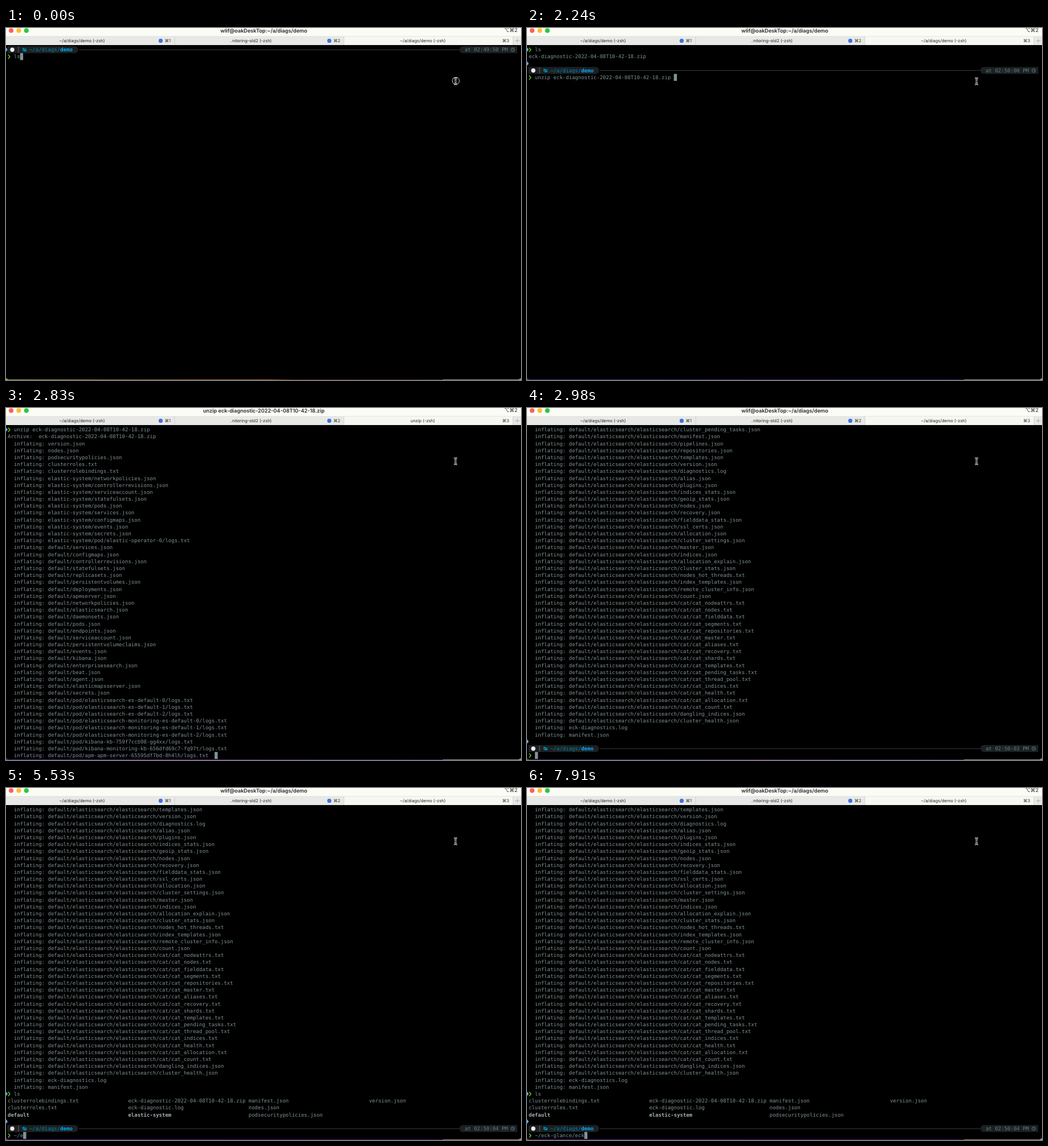
These frames come from a looping animation (904x619 px, 8000 ms). An HTML page with a canvas:

```html
<!DOCTYPE html>
<html lang="en">
<head>
<meta charset="utf-8">
<title>Terminal demo</title>
<style>
html, body { margin: 0; width: 100%; height: 100%; overflow: hidden; background: #000; }
canvas { display: block; }
</style>
</head>
<body>
<canvas id="stage" width="904" height="619"></canvas>
<script>
const ctx = document.getElementById('stage').getContext('2d');
const LOOP = 8000, CELL = 5.42, ROW = 12.19;
const MONO = '"DejaVu Sans Mono", monospace', SANS = 'Inter, sans-serif';
const GREY = '#7f9294', ZIP = 'eck-diagnostic-2022-04-08T10-42-18.zip';
const HOME = 'wlif@oakDeskTop:~/a/diags/demo', HOME_TAB = '~/a/diags/demo (-zsh)';
const colX = c => 3 + c * CELL;
const rowY = r => 32 + r * ROW;

// Terminal content
const inflate = (dir, names, ext = '') =>
  names.split(' ').map(n => '  inflating: ' + dir + n + ext);

const firstScreen = [
  '❯ unzip ' + ZIP,
  'Archive:  ' + ZIP,
  ...inflate('', 'version.json nodes.json podsecuritypolicies.json clusterroles.txt clusterrolebindings.txt'),
  ...inflate('elastic-system/', 'networkpolicies controllerrevisions serviceaccount statefulsets pods services configmaps events secrets', '.json'),
  ...inflate('elastic-system/pod/', 'elastic-operator-0', '/logs.txt'),
  ...inflate('default/', 'services configmaps controllerrevisions statefulsets replicasets persistentvolumes deployments apmserver networkpolicies elasticsearch daemonsets pods endpoints serviceaccount persistentvolumeclaims events kibana enterprisesearch beat agent elasticmapsserver secrets', '.json'),
  ...inflate('default/pod/', 'elasticsearch-es-default-0 elasticsearch-es-default-1 elasticsearch-es-default-2 elasticsearch-monitoring-es-default-0 elasticsearch-monitoring-es-default-1 elasticsearch-monitoring-es-default-2 kibana-kb-759f7ccb98-gg4xx kibana-monitoring-kb-656dfd69c7-fq97t apm-apm-server-65595df7bd-8h4lh', '/logs.txt')
];

const ES = 'default/elasticsearch/elasticsearch/';
const lastScreen = [
  ...inflate(ES, 'cluster_pending_tasks.json manifest.json pipelines.json repositories.json templates.json version.json diagnostics.log alias.json plugins.json indices_stats.json geoip_stats.json nodes.json recovery.json fielddata_stats.json ssl_certs.json allocation.json cluster_settings.json master.json indices.json allocation_explain.json cluster_stats.json nodes_hot_threads.txt index_templates.json remote_cluster_info.json count.json'),
  ...inflate(ES + 'cat/cat_', 'nodeattrs nodes fielddata segments repositories master aliases recovery shards templates pending_tasks thread_pool indices health allocation count', '.txt'),
  ...inflate(ES, 'dangling_indices cluster_health', '.json'),
  ...inflate('', 'eck-diagnostics.log manifest.json')
];

const listed = [
  ...lastScreen.slice(4), '❯ ls',
  ['clusterrolebindings.txt', ZIP, 'manifest.json', 'version.json'],
  ['clusterroles.txt', 'eck-diagnostic.log', 'nodes.json'],
  ['default', 'elastic-system', 'podsecuritypolicies.json']
];

// Timeline: each step holds until the next one
const steps = [];
const add = (at, scene) => steps.push({ at, glow: 1, title: HOME, tab: HOME_TAB, ...scene });
const lsDone = ['❯ ls', ZIP];
const busy = { title: 'unzip ' + ZIP, tab: 'unzip (-zsh)' };

add(0, { lines: [], prompt: 0, clock: '02:49:50', input: 'ls', glow: 0, click: true });
const typeZip = (at, input, glow) => add(at, { lines: lsDone, prompt: 3, clock: '02:50:00', input, glow });
typeZip(150, '', 0);
for (let i = 0; i < 7; i++) typeZip(1050 + i * 148.4, 'unzip e'.slice(0, i + 1), i / 7);
typeZip(2240, 'unzip ' + ZIP + ' ', 1);
add(2680, { lines: [...lsDone, firstScreen[0]], cursor: [0, 3], ...busy });
add(2830, { lines: firstScreen, cursor: [67, 47], ...busy });
add(2980, { lines: lastScreen, prompt: 46, clock: '02:50:03', input: '' });
add(3880, { lines: lastScreen, prompt: 46, clock: '02:50:03', input: 'ls' });
const typePath = (at, length, boldEnd) => add(at, {
  lines: listed, prompt: 46, clock: '02:50:04', input: '~/eck-glance/eck'.slice(0, length), boldEnd
});
[[4030, 0], [4780, 1], [5230, 2], [5530, 3], [5980, 4], [6130, 5], [6280, 6], [6420, 7],
 [6570, 8], [6720, 13, true], [7620, 14], [7770, 15], [7910, 16]].forEach(s => typePath(...s));

// Drawing helpers
function rect(x, y, w, h, color, radius = 0) {
  ctx.fillStyle = color;
  ctx.beginPath();
  ctx.roundRect(x, y, w, h, radius);
  ctx.fill();
}
function dot(x, y, r, color) {
  ctx.fillStyle = color;
  ctx.beginPath();
  ctx.arc(x, y, r, 0, 7);
  ctx.fill();
}
function stroke(path, color, width) {
  ctx.strokeStyle = color;
  ctx.lineWidth = width;
  ctx.stroke(new Path2D(path));
}
function label(str, x, y, size, weight = 400, align = 'left') {
  ctx.font = `${weight} ${size}px ${SANS}`;
  ctx.textAlign = align;
  ctx.fillStyle = '#262626';
  ctx.fillText(str, x, y);
}
function cells(str, col, row, color = GREY, bold = false) {
  ctx.font = `${bold ? 'bold ' : ''}9px ${MONO}`;
  ctx.textAlign = 'left';
  ctx.fillStyle = color;
  [...str].forEach((ch, i) => ch !== ' ' && ctx.fillText(ch, colX(col + i), rowY(row) + 9.2));
}
function chevron(row) {
  const y = rowY(row) + 6.3;
  stroke(`M3.8 ${y - 3.6}L6.8 ${y}L3.8 ${y + 3.6}`, '#63cf12', 1.5);
}
function mark(row) {
  const y = rowY(row) + 6;
  ctx.fillStyle = '#68b2f4';
  ctx.fill(new Path2D(`M0 ${y - 4}L3 ${y}L0 ${y + 4}Z`));
}
function cursor(col, row) {
  rect(colX(col), rowY(row), CELL, ROW, '#819294');
}

function drawChrome(s) {
  rect(0, 0, 904, 15, '#fbfcf6');
  ['#ff5f57', '#febc2e', '#28c840'].forEach((c, i) => dot(9 + i * 13.4, 4.6, 4.1, c));
  label(s.title, 452.5, 7.6, 9.1, 600, 'center');
  label('⌥⌘2', 898, 7.4, 9, 400, 'right');
  rect(0, 15, 904, 15, '#e8e9e6');
  rect(593, 15, 297, 15, '#f6f7f1');
  rect(0, 14.5, 904, 0.5, '#d2d3cf');
  [296, 593, 890].forEach(x => rect(x - 0.5, 15, 1, 15, '#d0d1ce'));
  [HOME_TAB, '..nitoring-old2 (-zsh)', s.tab].forEach((name, i) => {
    label(name, [133.5, 429.5, 731.5][i], 25, 7.5, 400, 'center');
    label('⌘' + (i + 1), 278.5 + i * 296.2, 25, 7.5);
    if (i < 2) dot(271.5 + i * 296, 22.4, 3.6, '#3f70e6');
  });
  stroke('M893.5 22.5h8M897.5 18.5v8', '#a2a3a0', 0.8);
}

function drawGlow(amount) {
  const strip = (...stops) => {
    const g = ctx.createLinearGradient(0, 0, 767, 0);
    stops.forEach(([at, c]) => g.addColorStop(at, c));
    ctx.fillStyle = g;
    ctx.fillRect(0, 616, 767, 3);
  };
  strip([0, '#a99a48'], [0.3, '#8b6a28'], [0.6, '#b4661f'], [0.66, '#4a2018'], [1, '#4b3038']);
  ctx.globalAlpha = amount;
  strip([0, '#4a2a86'], [0.5, '#4c1d80'], [1, '#3b1a66']);
  ctx.globalAlpha = 1;
  rect(767, 616, 137, 3, '#9a9694');
  rect(0, 30, 904, 588, '#000', [0, 0, 5, 5]);
}

function drawPrompt(row, clock) {
  const y = rowY(row), mid = y + 6.2, pill = '#1c2022';
  rect(2.5, y, 124, ROW, pill, [0, 6, 6, 0]);
  rect(796, y, 101.3, ROW, pill, [6, 0, 0, 6]);
  rect(128, mid - 0.5, 668, 1, '#393d3d');
  dot(11, mid, 3.7, '#eeeeee');
  rect(21.6, y + 0.5, 0.9, 11, '#6b7070');
  ctx.fillStyle = '#0087af';
  ctx.fill(new Path2D(`M29 ${mid - 3}h2.6l1 1h3v1.2h-4.2l-1.5 2.8h-0.9z
    M31.8 ${mid - 0.3}h5l-1.6 3.3h-5z`));
  cells('~/a/diags/', 7, row, '#0087af');
  cells('demo', 17, row, '#00afff', true);
  cells(`at ${clock} PM`, 148, row, '#5f8080');
  ctx.strokeStyle = '#5f8080';
  ctx.lineWidth = 1;
  ctx.beginPath();
  ctx.arc(889.5, mid, 3.1, 0, 7);
  ctx.stroke();
  stroke(`M889.5 ${mid - 2}v2.2h1.5`, '#5f8080', 0.8);
}

function drawPointer(click) {
  const beam = 'M786.3 88q2.2 0 2.8 1.8q.6-1.8 2.8-1.8M789.1 89.8v7.6M786.3 99.2q2.2 0 2.8-1.8q.6 1.8 2.8 1.8M787.5 93.8h3.2';
  stroke(beam, '#e2e2e2', 2.7);
  stroke(beam, '#000', 0.9);
  if (!click) return;
  ctx.strokeStyle = '#cfcfcf';
  ctx.lineWidth = 1;
  ctx.beginPath();
  ctx.arc(789.6, 92.8, 6.2, 0, 7);
  ctx.stroke();
}

function draw(s) {
  ctx.textRendering = 'geometricPrecision';
  drawGlow(s.glow);
  drawChrome(s);
  s.lines.forEach((line, row) => {
    if (Array.isArray(line)) {
      line.forEach((name, i) => {
        const folder = !name.includes('.');
        cells(name, i * 39, row, folder ? '#a3b2b2' : GREY, folder);
      });
    } else if (line[0] === '❯') {
      mark(row);
      chevron(row);
      cells(line.slice(2), 2, row);
    } else cells(line, 0, row);
  });
  if (s.cursor) cursor(...s.cursor);
  else {
    const row = s.prompt + 1, last = s.input.length - 1;
    mark(Math.max(0, s.prompt - 1));
    drawPrompt(s.prompt, s.clock);
    chevron(row);
    cells(s.boldEnd ? s.input.slice(0, last) : s.input, 2, row);
    if (s.boldEnd) cells(s.input[last], 2 + last, row, GREY, true);
    cursor(3 + last, row);
  }
  drawPointer(s.click);
}

let shown;
const start = performance.now();
function tick() {
  const t = (performance.now() - start) % LOOP;
  const step = steps.findLast(s => s.at <= t) || steps[0];
  if (step !== shown) draw(shown = step);
  requestAnimationFrame(tick);
}
tick();
</script>
</body>
</html>
```
